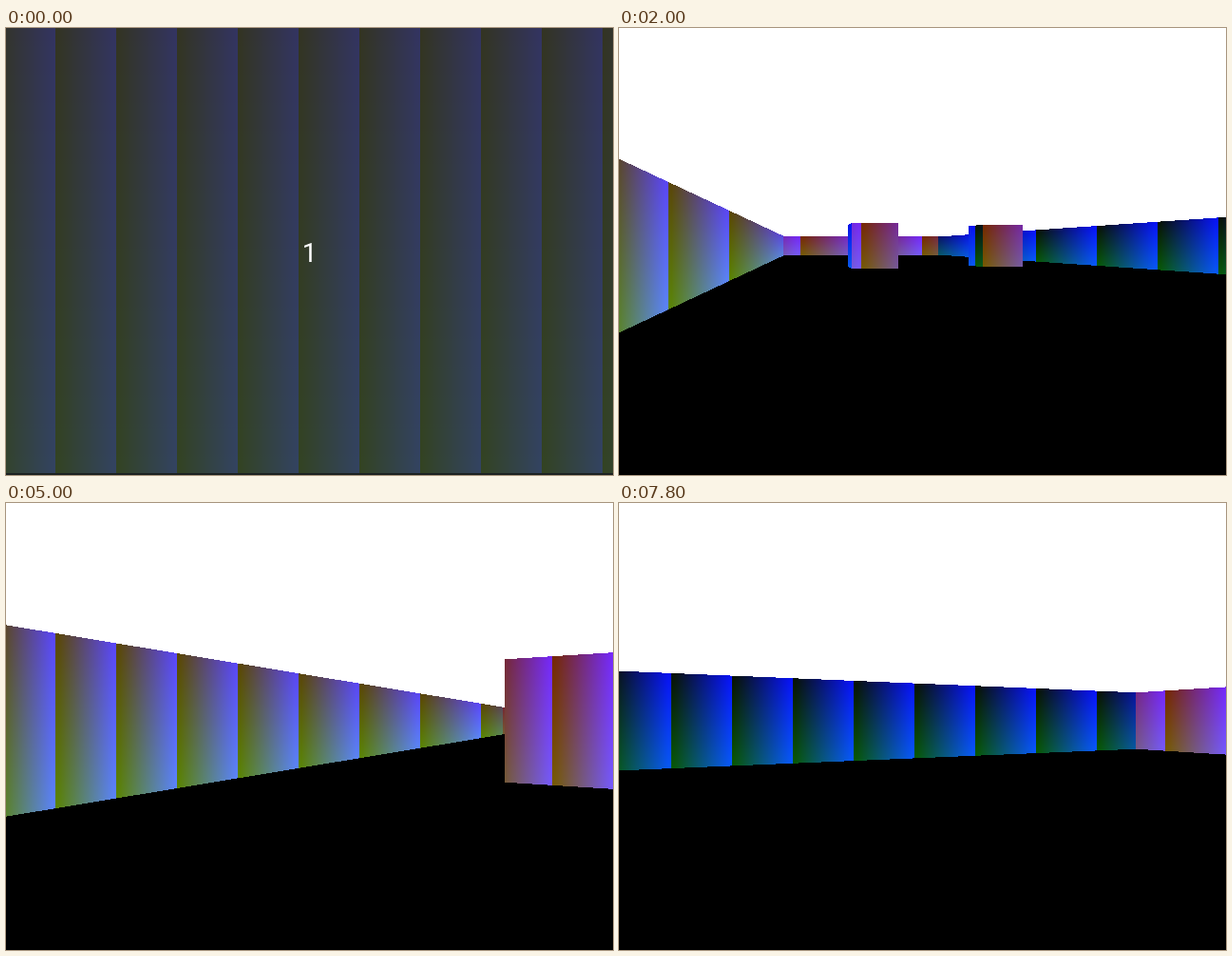
Recreate the animation shown at these times as an HTML page with a canvas. Size 639x470 px, loop 8000 ms.

```html
<!DOCTYPE html>
<html>
<head>
<meta charset="utf-8">
<style>
  html, body { margin: 0; height: 100%; overflow: hidden; background: #000; }
  canvas { display: block; }
</style>
</head>
<body>
<canvas id="stage" width="639" height="470"></canvas>
<script>
const ctx = document.getElementById('stage').getContext('2d');
const W = 639, H = 470, VIEW_H = 468, HORIZON = 229, CENTER = 320;
const FOCAL = 490, HALF_WALL = 240;
const LOOP = 8000, TICK = 100;

// Red level, green range from top to bottom, and horizontal texture offset
const OLIVE = { red: 90, top: 70, bottom: 132, offset: 12 };
const PURPLE = { red: 117, top: 40, bottom: 90, offset: 1 };
const BLUE = { red: 8, top: 18, bottom: 88, offset: 9 };

// Walls lie on x = at or y = at
const wall = (axis, at, from, to, skin) => ({ axis, at, from, to, skin });
const pillar = (x, y) => [
  wall('x', x, y, y + 1, BLUE), wall('x', x + 1, y, y + 1, OLIVE),
  wall('y', y, x, x + 1, PURPLE), wall('y', y + 1, x, x + 1, PURPLE)
];
const walls = [
  wall('x', 0, -1, 24, OLIVE), wall('x', 8, -1, 24, BLUE),
  wall('y', -1, 0, 8, PURPLE), wall('y', 24, 0, 8, PURPLE),
  ...pillar(2, 10), ...pillar(5, 10)
];

// Key presses: [start ms, signed amount], carried out at a constant speed
const TURN_SPEED = 0.118, WALK_SPEED = 0.0053, WALK_HEADING = 14.3;
const turns = [[680, 104.3], [3355, -34.8], [4040, -18.5], [4929, 38], [5880, 29],
  [6375, 18.3], [6745, 22.7], [7140, 19], [7546, 29.6]];
const walks = [[1990, 1.54], [2405, 4.75]];

const progress = (list, speed, t) => list.reduce((sum, [start, amount]) =>
  sum + Math.sign(amount) * Math.min(Math.abs(amount), Math.max(0, t - start) * speed), 0);
const rad = deg => deg * Math.PI / 180;

function cast(px, py, dx, dy) {
  let depth = Infinity, skin = PURPLE;
  for (const w of walls) {
    const z = w.axis === 'x' ? (w.at - px) / dx : (w.at - py) / dy;
    const along = w.axis === 'x' ? py + z * dy : px + z * dx;
    if (z > 0 && z < depth && along >= w.from && along <= w.to) {
      depth = z;
      skin = w.skin;
    }
  }
  return { depth, skin };
}

function drawColumn(x, { depth, skin }) {
  const half = HALF_WALL / depth;
  const top = Math.round(HORIZON - half), bottom = Math.round(HORIZON + half);
  const blue = 4 * ((x + skin.offset) % 64);
  const fill = ctx.createLinearGradient(0, top, 0, bottom);
  fill.addColorStop(0, `rgb(${skin.red},${skin.top},${blue})`);
  fill.addColorStop(1, `rgb(${skin.red},${skin.bottom},${blue})`);
  ctx.fillStyle = fill;
  ctx.fillRect(x, top, 1, bottom - top);
}

function drawCountdown() {
  ctx.fillStyle = 'rgba(38,46,46,0.75)';
  ctx.fillRect(0, 0, W, H);
  ctx.fillStyle = '#fff';
  ctx.font = '28px Roboto, sans-serif';
  ctx.textAlign = 'center';
  ctx.fillText('1', 319.5, 246);
}

function draw(t) {
  const yaw = rad(-90 + progress(turns, TURN_SPEED, t));
  const walked = progress(walks, WALK_SPEED, t);
  const px = 1 + walked * Math.sin(rad(WALK_HEADING));
  const py = -0.08 + walked * Math.cos(rad(WALK_HEADING));
  const sin = Math.sin(yaw), cos = Math.cos(yaw);

  ctx.fillStyle = '#fff';
  ctx.fillRect(0, 0, W, HORIZON);
  ctx.fillStyle = '#000';
  ctx.fillRect(0, HORIZON, W, H - HORIZON);
  for (let x = 0; x < W; x++) {
    const s = (x + 0.5 - CENTER) / FOCAL;
    drawColumn(x, cast(px, py, sin + s * cos, cos - s * sin));
  }
  ctx.fillStyle = '#000';
  ctx.fillRect(0, VIEW_H, W, H - VIEW_H);
  if (t < TICK) drawCountdown();
}

let shown = -1;
const begin = performance.now();
function frame() {
  const elapsed = (performance.now() - begin) % LOOP;
  const tick = Math.floor(elapsed / TICK) * TICK;
  if (tick !== shown) draw(shown = tick);
  requestAnimationFrame(frame);
}
frame();
</script>
</body>
</html>
```
